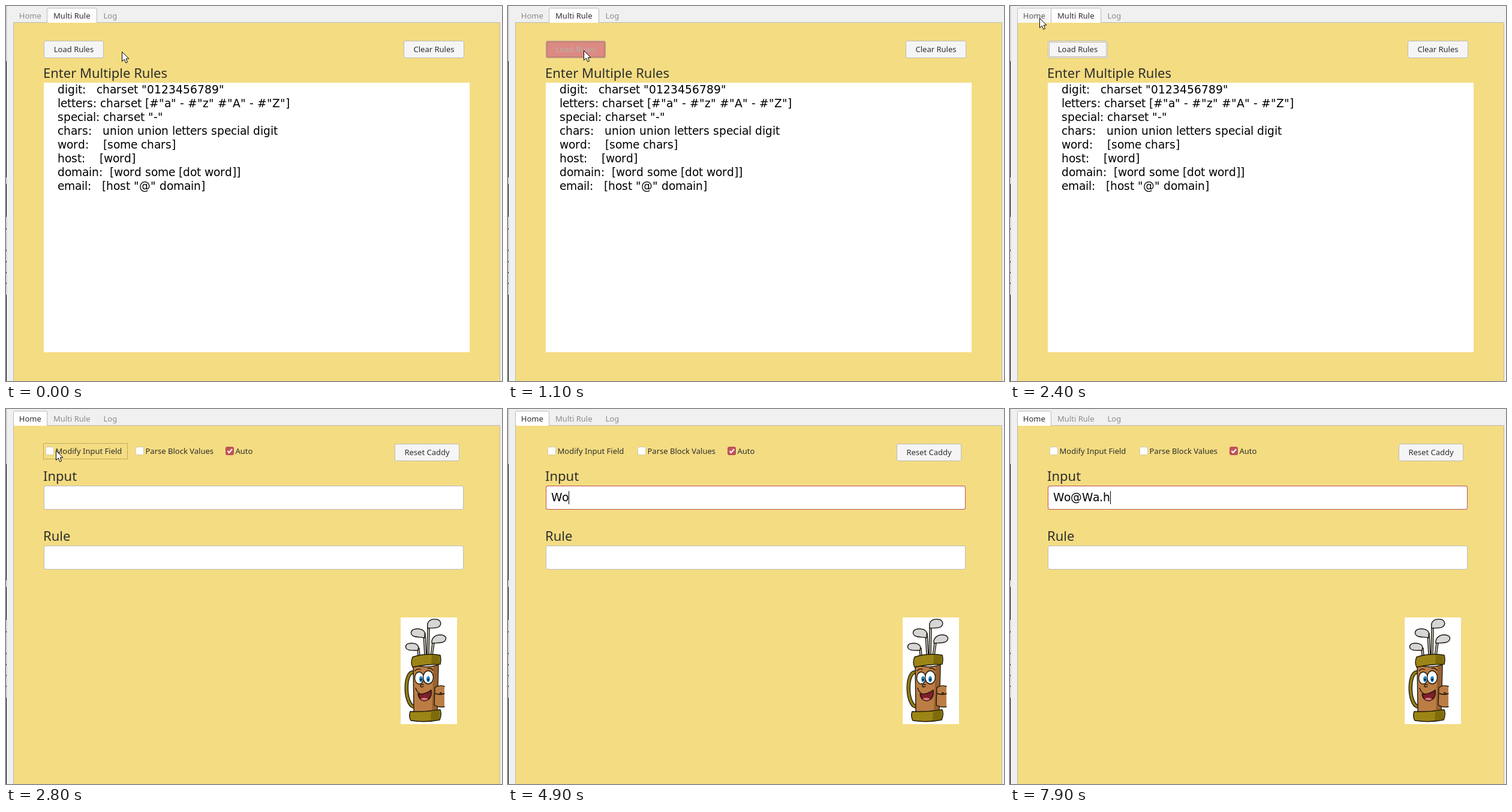
Recreate the animation shown at these times as an HTML page. Size 827x626 px, loop 8 s.

```html
<!DOCTYPE html>
<html lang="en">
<head>
<meta charset="utf-8">
<title>Rule editor</title>
<style>
  html, body { margin: 0; width: 100%; height: 100%; overflow: hidden; background: #f0f0f0; }
  svg { display: block; }
  text { font: 13px "Noto Sans", "Open Sans", sans-serif; fill: #2e2e2e; }
  .head { font-size: 22px; }
  .mono { font: 18.67px "DejaVu Sans", sans-serif; fill: #000; white-space: pre; }
  .mid { text-anchor: middle; }
  .btn { fill: #f5f5f5; stroke: #bbb; }
  .field { fill: #fff; stroke: #bbb; }
  .dots { fill: none; stroke: #8a7a45; stroke-dasharray: 1 1; }
  .ink { stroke: #1c1608; stroke-width: 1.4; stroke-linejoin: round; stroke-linecap: round; }
</style>
</head>
<body>
<svg id="stage" width="827" height="626" viewBox="0 0 827 626">
  <rect width="827" height="626" fill="#f0f0f0"/>
  <path d="M.5 0V626" stroke="#cfcfd2"/>
  <path d="M.5 92V286M.5 297V352M.5 482V626M.5 371v2M.5 407v2M.5 426v2M.5 444v2M.5 462v2" stroke="#17181c"/>
  <path d="M1.5 0V626" stroke="#d9d9d9"/>
  <path d="M12.5 626V27.5H823.5V626" fill="#f4dc82" stroke="#b9b9b9"/>
  <g id="tabs"></g>

  <g id="multi">
    <rect id="load" class="btn" x="63.5" y="58.5" width="99" height="28" rx="2.5"/>
    <rect id="loadFocus" class="dots" x="65.5" y="60.5" width="95" height="24"/>
    <text id="loadText" class="mid" x="113" y="77">Load Rules</text>
    <rect class="btn" x="663.5" y="58.5" width="100" height="28" rx="2.5"/>
    <text class="mid" x="713.5" y="77">Clear Rules</text>
    <text class="head" x="62" y="120">Enter Multiple Rules</text>
    <rect x="63" y="128" width="710" height="450" fill="#fff"/>
    <g id="rules"></g>
  </g>

  <g id="home">
    <g id="checks"></g>
    <rect id="checkFocus" class="dots" x="62.5" y="57.5" width="140" height="26"/>
    <rect class="btn" x="648.5" y="58.5" width="107" height="28" rx="2.5"/>
    <text class="mid" x="702" y="77">Reset Caddy</text>
    <text class="head" x="62" y="120">Input</text>
    <rect class="field" x="63.5" y="128.5" width="699" height="39" rx="2.5"/>
    <rect id="inputFocus" x="63.5" y="128.5" width="699" height="39" rx="2.5" fill="none" stroke="#c0504d"/>
    <text id="typed" class="mono" y="154"></text>
    <rect id="caret" y="137" width="1" height="22"/>
    <text class="head" x="62" y="220">Rule</text>
    <rect class="field" x="63.5" y="228.5" width="699" height="39" rx="2.5"/>

    <g id="bag">
      <rect x="658" y="348" width="94" height="178" fill="#fff"/>
      <g class="ink" fill="#d6d6d6">
        <path d="M686 400l1 12h3l-1-13zM696 376l2 36h3l-2-38zM703 364l-1 48h3l1-48zM711 390l-3 22h3l3-21z"/>
        <path d="M703 364c-2-9 5-14 13-13 8 0 10 6 8 10-3 6-13 4-21 5z"/>
        <path d="M698 378c2-8-5-11-12-11-8 0-12 4-10 9 3 6 14 4 22 6z"/>
        <path d="M710 391c-1-9 6-14 14-14 7 0 11 4 9 8-3 7-15 5-23 6z"/>
        <path d="M687 402c3-8-4-11-11-11-8 0-11 4-9 8 3 5 12 4 20 4z"/>
      </g>
      <path d="M681 440C664 434 663 492 680 497" fill="none" stroke="#1c1608" stroke-width="6.5"/>
      <path d="M681 440C664 434 663 492 680 497" fill="none" stroke="#8e7c18" stroke-width="4"/>
      <path class="ink" d="M679 427Q700 434 721 427L719 506H680z" fill="#bc7d45"/>
      <path d="M713 430l7-2-2 76h-8z" fill="#99602f"/>
      <path class="ink" d="M731 463q-9-3-16 2l-1 29q7 5 17 3" fill="#bc7d45"/>
      <path class="ink" d="M716 475q8 3 15 0" fill="none"/>
      <circle class="ink" cx="725" cy="475" r="1.5" fill="#bc7d45"/>
      <path class="ink" d="M678 414q22-7 46-3 2 7 0 15-23 0-46 5-4-8 0-17z" fill="#9c8516"/>
      <path class="ink" d="M674 505q25 1 50-3 3 8-1 17-24 5-48 1-4-7-1-15z" fill="#9c8516"/>
      <path d="M710 411l13 1v13l-14 1zM709 504l14-1v15l-15 2z" fill="#7e6c0c"/>
      <path class="ink" d="M682 437q5-5 9-2M703 433q5-2 9 3" fill="none"/>
      <g class="ink" fill="#fff">
        <ellipse cx="689" cy="449" rx="7.5" ry="10"/>
        <ellipse cx="704" cy="448" rx="8.5" ry="11"/>
      </g>
      <g fill="#2684c6"><ellipse cx="692" cy="451" rx="3" ry="5"/><ellipse cx="704" cy="451" rx="3" ry="5"/></g>
      <circle cx="692" cy="452" r="1.4"/><circle cx="704" cy="452" r="1.4"/>
      <path class="ink" d="M696 460q-6-1-5 3 2 2 5 0M683 466q3 9 11 11" fill="none"/>
      <path class="ink" d="M687 476q14 0 22-7 2 15-10 18-10 0-12-11z" fill="#7e1f2c"/>
      <path d="M691 484q6-4 13 0-6 5-13 0z" fill="#e0757a"/>
    </g>
  </g>

  <path id="arrow" d="M.5 .5V16.5L4.3 13 6.8 19 9.6 17.8 7.1 12H12z" fill="#fff" stroke="#000" stroke-linejoin="round"/>
  <g id="beam" fill="none" stroke-linecap="square">
    <path d="M-3 -7H3M0 -7V7M-3 7H3" stroke="#000" stroke-width="3"/>
    <path d="M-2.5 -7H2.5M0 -7V7M-2.5 7H2.5" stroke="#fff"/>
  </g>
</svg>
<script>
const LOOP = 8000, STEP = 100;
const $ = id => document.getElementById(id);
const show = (id, on) => $(id).style.display = on ? "" : "none";
const set = (el, attrs) => { for (const k in attrs) el.setAttribute(k, attrs[k]); return el; };
const add = (parent, tag, attrs, text = "") => {
  const el = set(document.createElementNS("http://www.w3.org/2000/svg", tag), attrs);
  el.textContent = text;
  return parent.appendChild(el);
};

// Whole-pixel glyph advances, as hinted desktop text has them.
const pen = document.createElement("canvas").getContext("2d");
pen.font = '1000px "DejaVu Sans", sans-serif';
const advance = c => Math.round(pen.measureText(c).width * 0.01867);
function setMono(el, text, x) {
  const xs = [];
  for (const c of text) { xs.push(x); x += advance(c); }
  el.textContent = text;
  if (xs.length) el.setAttribute("x", xs.join(" "));
  return x;
}

const tabs = [["Home", 12, 56], ["Multi Rule", 68, 83], ["Log", 151, 45]].map(([name, x, w]) => ({
  box: add($("tabs"), "path", { d: `M${x + .5} 28V5.5q0-2 2-2h${w - 4}q2 0 2 2V28` }),
  label: add($("tabs"), "text", { class: "mid", x: x + w / 2 + .3, y: 21 }, name)
}));
const tabStyle = {
  idle: ["none", "none", "#8b8b8b"],
  hover: ["#f7f7f7", "#c4c4c4", "#5c5c5c"],
  active: ["#fff", "#b9b9b9", "#2e2e2e"]
};
function styleTab(tab, state) {
  const [fill, stroke, color] = tabStyle[state];
  set(tab.box, { fill, stroke });
  tab.label.style.fill = color;
}

[
  'digit:   charset "0123456789"',
  'letters: charset [#"a" - #"z" #"A" - #"Z"]',
  'special: charset "-"',
  "chars:   union union letters special digit",
  "word:    [some chars]",
  "host:    [word]",
  "domain:  [word some [dot word]]",
  'email:   [host "@" domain]'
].forEach((line, i) => setMono(add($("rules"), "text", { class: "mono", y: 146 + 23 * i }), line, 86));

[["Modify Input Field", 66], ["Parse Block Values", 216], ["Auto", 366]].forEach(([name, x], i) => {
  const on = i === 2;
  add($("checks"), "rect", { x: x + .5, y: 63.5, width: 13, height: 13, rx: 2,
    fill: on ? "#c2555a" : "#fff", stroke: on ? "#b5484d" : "#d2cbb0" });
  if (on) add($("checks"), "path", { d: `M${x + 3.5} 70l2.5 3 5-6`, fill: "none", stroke: "#fff", "stroke-width": 2 });
  add($("checks"), "text", { x: x + 16.5, y: 75 }, name);
});

// Pointer stops: time, x, y
const stops = [
  [100, 193, 76], [500, 87, 67], [800, 126, 74], [1300, 126, 74], [1800, 134, 57],
  [2400, 49, 20], [2799, 49, 20], [2800, 83, 69], [3400, 128, 147], [3500, 128, 147], [3800, 130, 150]
];
function pointer(t) {
  const n = stops.findIndex(s => s[0] > t);
  if (n === 0) return stops[0].slice(1);
  if (n < 0) return stops[stops.length - 1].slice(1);
  const [t0, x0, y0] = stops[n - 1], [t1, x1, y1] = stops[n];
  const k = (t - t0) / (t1 - t0);
  return [Math.round(x0 + (x1 - x0) * k), Math.round(y0 + (y1 - y0) * k)];
}

const message = "Wo@Wa.h";
const keyTimes = [4700, 4900, 6100, 6700, 7000, 7600, 7900];
const pressLook = [["#f5f5f5", "#bbb", "#2e2e2e"], ["#dc8a83", "#b79a96", "#b9b0ad"], ["#c5585c", "#b04a4e", "#fff"]];

function draw(time) {
  const t = Math.floor(time / STEP) * STEP;
  const home = t >= 2800;
  const [x, y] = pointer(t);
  show("home", home);
  show("multi", !home);
  styleTab(tabs[0], home ? "active" : x < 69 && y < 28 ? "hover" : "idle");
  styleTab(tabs[1], home ? "idle" : "active");
  styleTab(tabs[2], "idle");

  const press = t === 1200 ? 2 : t === 1100 || t === 1300 ? 1 : 0;
  const [fill, stroke, color] = pressLook[press];
  $("load").style.fill = fill;
  $("load").style.stroke = stroke;
  $("loadText").style.fill = color;
  show("loadFocus", t >= 1100);

  show("checkFocus", t < 3600);
  $("inputFocus").style.opacity = Math.max(0, Math.min(1, (t - 3500) / 300));
  const count = keyTimes.filter(k => k <= t).length;
  $("caret").setAttribute("x", setMono($("typed"), message.slice(0, count), 72));
  show("caret", t >= 3600 && (t < 4400 || t >= 4700));

  const overInput = home && y >= 128;
  show("arrow", !overInput);
  show("beam", overInput && t < 4700);
  $("arrow").setAttribute("transform", `translate(${x} ${y})`);
  $("beam").setAttribute("transform", `translate(${x} ${y})`);
}

function tick() {
  draw(performance.now() % LOOP);
  requestAnimationFrame(tick);
}
tick();
</script>
</body>
</html>
```
